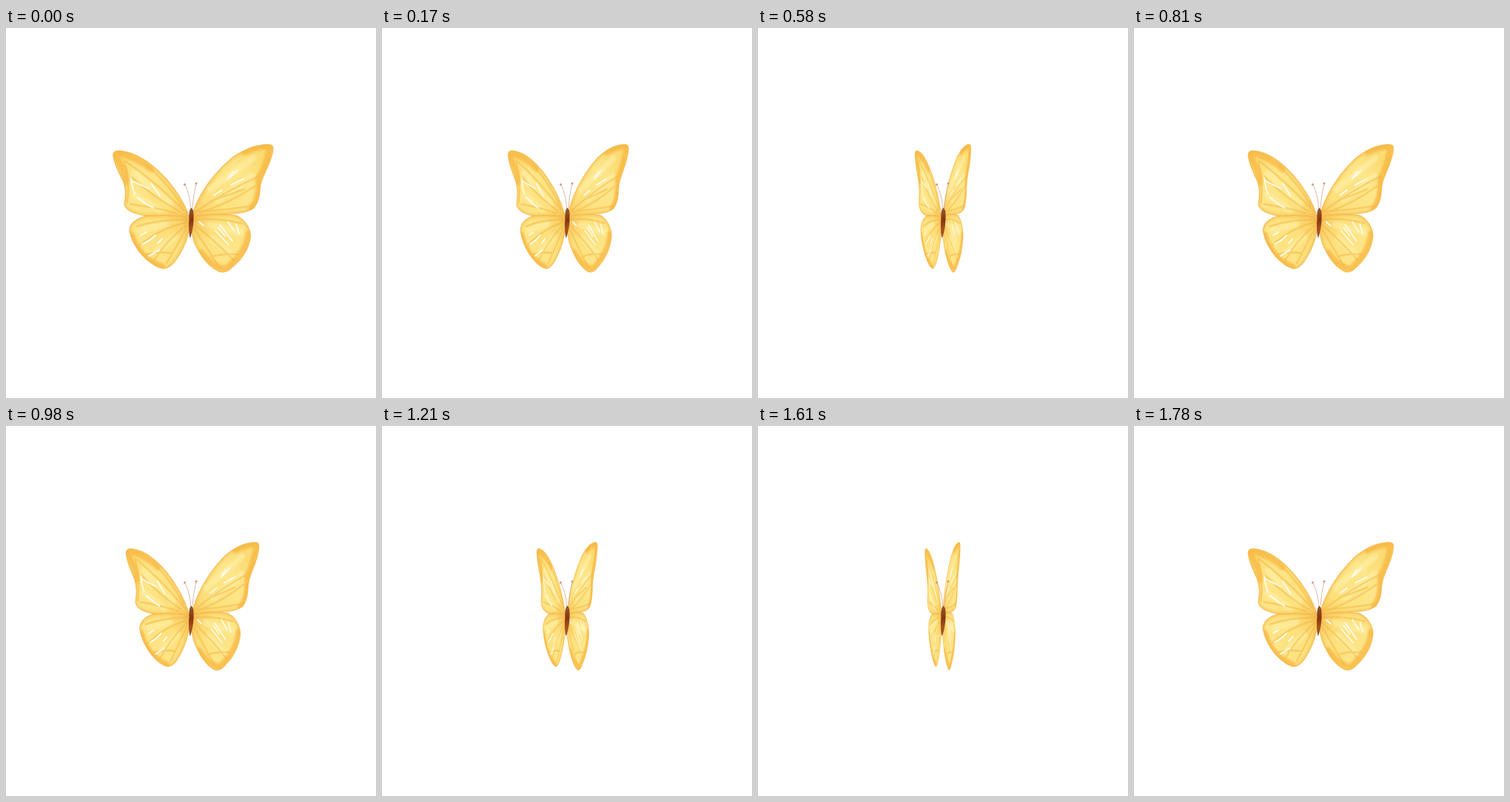
An HTML page for the animation above (1830 ms loop, 500x500 px).

```html
<!DOCTYPE html>
<html lang="en">
<head>
<meta charset="utf-8">
<title>Butterfly</title>
<style>
  html, body { margin: 0; width: 100%; height: 100%; overflow: hidden; background: #fff; }
  svg { display: block; width: 100%; height: 100%; }
  path { fill: none; stroke-linecap: round; stroke-linejoin: round; }
  .base { fill: url(#wash); }
  .rim { stroke: #f6bb48; stroke-width: 6; opacity: .45; filter: url(#soft); }
  .edge { stroke: #f5b84a; stroke-width: 1.4; opacity: .8; }
  .margin { stroke: #f7ae36; stroke-width: 8; opacity: .6; filter: url(#soft); }
  .vein { stroke: #f3b843; stroke-width: 2.6; opacity: .5; }
  .pale { stroke: #fff3b0; stroke-width: 9; opacity: .5; filter: url(#soft); }
  .shine { stroke: #fffdf4; stroke-width: 1.8; }
  .antenna { stroke: #d9b09c; stroke-width: .9; }
</style>
</head>
<body>
<svg viewBox="0 0 500 500">
  <defs>
    <radialGradient id="wash" gradientUnits="userSpaceOnUse" cx="249" cy="258" r="120">
      <stop offset="0" stop-color="#f3b04c"/>
      <stop offset=".12" stop-color="#f9d06a"/>
      <stop offset=".3" stop-color="#fde07c"/>
      <stop offset=".75" stop-color="#fde68a"/>
      <stop offset="1" stop-color="#fbdb74"/>
    </radialGradient>
    <linearGradient id="fur" x2="0" y2="1">
      <stop offset="0" stop-color="#9a5a2c"/>
      <stop offset=".4" stop-color="#83360f"/>
      <stop offset=".7" stop-color="#a8531f"/>
      <stop offset="1" stop-color="#8d4a20"/>
    </linearGradient>
    <filter id="soft" x="-20%" y="-20%" width="140%" height="140%"><feGaussianBlur stdDeviation="1.4"/></filter>
  </defs>
  <g id="left"></g>
  <g id="right"></g>
  <path class="antenna" d="M249.500 243Q249 226 241.500 211M252 243Q253 226 257 210"/>
  <g fill="#d09a80"><circle cx="241.500" cy="211.500" r="1.500"/><circle cx="257" cy="210" r="1.500"/></g>
  <path style="fill:url(#fur)" d="M250.500 243C253 244 254 250 253.500 257C253.500 267 251.500 277 248.800 284C247 279 246.500 268 247.500 258C247 251 248 244 250.500 243Z"/>
</svg>
<script>
const wings = {
  left: [
    {
      outline: 'M247 254C220 253 205 254 190 254C172 251 161 246 160 238C162 228 162 215 158 206C153 196 146 184 145 173C144 167 149 165 157 166.500C178 169 196 183 212 199C228 216 241 236 247 254Z',
      margin: 'M147 169Q172 172 196 191M148 172Q163 196 162 208',
      vein: 'M240 246Q200 206 160 179M235 248Q203 231 170 202M230 250Q200 242 168 238M160 182Q168 205 164 236M190 185Q222 214 238 241',
      pale: 'M174 196L222 238M174 226L207 246',
      shine: 'M169 203Q170 215 174 224M171 207L193 217M196 210L208 227M177 229L190 238M191 239L199 243'
    },
    {
      outline: 'M247 255C227 253 210 253 190 254C174 258 166 266 167 275C170 288 176 298 185 308C194 317 204 324 213 325C225 324 233 309 239 298C245 286 249 271 247 255Z',
      margin: 'M170 280Q180 312 211 322',
      vein: 'M244 259Q205 259 177 268M243 263Q210 270 181 293M243 267Q217 287 200 314M243 272Q231 294 217 318M189 306Q205 302 224 304',
      pale: 'M182 273L216 265M203 303L228 282',
      shine: 'M184 292Q194 288 202 280M193 308L207 300M205 291L211 285M182 280L190 276'
    }
  ],
  right: [
    {
      outline: 'M252 254C253 246 257 237 263 226C273 208 288 190 306 175C322 164 338 158 352 157.500C361 157 362 160 360 169C357 184 348 197 344 211C342 222 344 232 335 243C325 251 305 251 288 252C272 253 260 254 252 254Z',
      margin: 'M356 161Q352 186 341 203Q343 230 331 244M357 160Q340 160 322 168',
      vein: 'M256 248Q300 246 334 240M258 247Q300 219 340 201M262 249Q300 238 336 214M285 231L322 218',
      pale: 'M275 219L334 176M287 232L333 200',
      shine: 'M299 204Q307 199 313 192M281 226L292 219M304 212L321 204M301 201L307 194'
    },
    {
      outline: 'M252 255C268 252 289 251 309 253C321 257 330 269 330.500 281C328.500 298 319.500 312 306 323C300 329 294 331 288 329C272 322 262 306 255 291C251 279 249 265 252 255Z',
      margin: 'M327 278Q325 302 297 325Q281 324 264 303',
      vein: 'M254 259Q289 256 318 264M255 266Q282 287 308 314M254 270Q269 294 289 324M278 309Q293 304 313 306',
      pale: 'M274 266L317 276M279 284L304 306',
      shine: 'M283 274L301 293M289 266L306 288M300 262L309 275M311 265L315 278M287 270L296 281M261 262L267 267'
    }
  ]
};

const layer = (name, d) => `<path class="${name}" d="${d}"/>`;

for (const [side, parts] of Object.entries(wings)) {
  document.getElementById(side).innerHTML = parts.map((part, i) => {
    const id = `${side}${i}`;
    const inside = layer('base', part.outline) + layer('rim', part.outline) +
      ['margin', 'pale', 'vein', 'shine'].map(name => layer(name, part[name])).join('');
    return `<clipPath id="${id}"><path d="${part.outline}"/></clipPath>` +
      `<g clip-path="url(#${id})">${inside}</g>` + layer('edge', part.outline);
  }).join('');
}

const LOOP = 1830, STEP = 57.5, HINGE = 248.5;
const SLOW_FLAP = 906, FAST_FLAP = 464;

// One slow flap, then two quick ones.
function openness(time) {
  const phase = time < SLOW_FLAP ? time / SLOW_FLAP : (time - SLOW_FLAP) / FAST_FLAP;
  return 0.61 + 0.39 * Math.cos(2 * Math.PI * phase);
}

function fold(side, scale) {
  document.getElementById(side).setAttribute('transform', `translate(${HINGE} 0) scale(${scale} 1) translate(${-HINGE} 0)`);
}

const start = performance.now();
function draw(now) {
  const time = Math.max(0, now - start) % LOOP;
  // Poses advance every 57.5 ms, rounded to 10 ms ticks.
  const step = Math.ceil((Math.floor(time / 10) + 0.5) * 10 / STEP) - 1;
  const scale = openness(step * STEP);
  fold('left', scale);
  fold('right', scale);
  requestAnimationFrame(draw);
}
draw(start);
</script>
</body>
</html>
```
